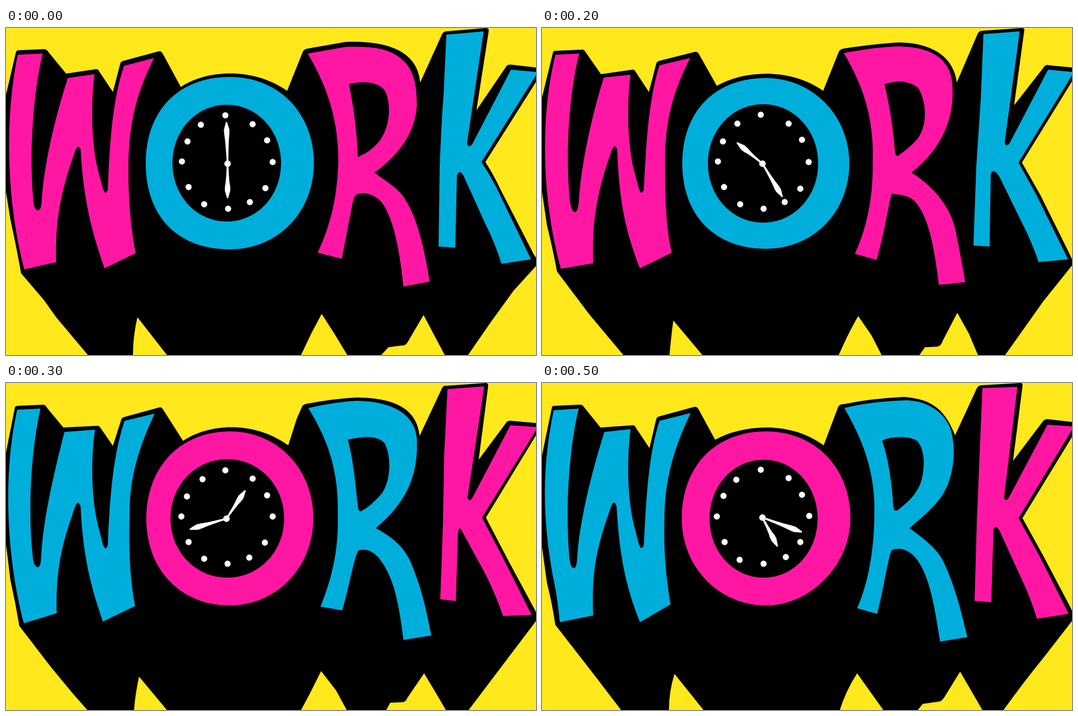
An HTML page with a canvas for the animation above (600 ms loop, 952 by 588 pixels).

```html
<!DOCTYPE html>
<html lang="en">
<head>
<meta charset="utf-8">
<title>Work clock</title>
<style>
html, body { margin: 0; width: 100%; height: 100%; overflow: hidden; background: #ffe81b; }
canvas { display: block; width: 100vw; height: 100vh; }
</style>
</head>
<body>
<canvas id="stage" width="952" height="588"></canvas>
<script>
const ctx = document.getElementById('stage').getContext('2d');
const YELLOW = '#ffe81b', PINK = '#ff17a4', BLUE = '#00aedb';
const STEP = 100;

// Four hand-drawn poses of the lettering; the line "boils" between them.
// "bulge" rounds the ring's corners: top left, top right, bottom right, bottom left.
const poses = [
  {
    colors: [PINK, BLUE],
    shadow: 'M18,43 Q19,40 23,40 L68,38 Q73,38 76,43 L108,82 L162,74 Q166,74 168,79 L192,115 L205,65 Q206,60 211,59 L274,42 Q279,41 282,47 L314,106 C362,74 446,71 505,113 L533,43 Q535,38 542,37 L610,25 C700,22 740,50 744,98 L782,14 Q785,6 791,6 L862,0 Q868,0 867,6 L845,148 L898,70 Q901,65 908,66 L952,71 V97 L861,241 Q876,264 888,290 L948,407 L952,413 V428 L912,472 L870,530 L830,588 H788 L750,516 L722,564 Q718,572 710,571 L687,574 L674,588 H613 L590,550 L567,514 L548,550 L530,588 H289 L236,520 Q228,555 228,588 H147 L90,520 L68,489 L27,441 Q20,400 8,345 L0,295 V120 Z',
    w: 'M21,48 L66,46 C50,110 41,220 49,310 Q51,328 57,328 Q63,328 64,312 C68,250 84,175 111,90 L159,83 C153,130 152,200 165,255 L174,289 Q179,303 183,290 C186,210 191,130 212,68 L266,54 C238,110 219,165 220,260 C220,310 224,360 233,405 L177,432 C155,370 139,310 134,218 Q130,209 125,219 C100,290 88,340 90,421 L33,434 C5,330 -6,180 21,48Z',
    ring: [402, 243, 151, 155],
    bulge: [.61, .58, .57, .62],
    face: [396.5, 243, 97.5, 105],
    r: 'M542,46 L610,34 C660,33 690,36 715,60 C735,80 738,110 738,140 C735,185 710,225 662,260 C685,278 706,288 718,310 C740,345 752,400 761,456 L714,465 C708,410 698,340 672,310 C658,298 645,296 634,298 Q625,299 622,318 L603,415 L560,404 C585,350 595,300 597,240 C597,170 580,110 542,46Z M616,101 C640,95 670,95 682,115 C692,140 690,175 672,202 C655,222 645,226 632,232 C630,180 624,140 616,101Z',
    k: 'M791,12 L858,6 L828,207 Q831,218 838,208 L907,75 L952,79 V85 L854,241 Q868,262 880,285 L943,416 L890,424 Q878,385 860,350 L822,266 Q815,253 810,265 L807,395 L777,393 L779,250 Q782,170 786,120Z',
    dots: [394,157, 443,173, 469,202, 479,241, 466,288, 438,313, 399,325, 356,317, 328,286, 316,240, 326,204, 350,174],
    hub: [398, 244]
  },
  {
    colors: [BLUE, PINK],
    shadow: 'M18,43 Q19,41 23,41 L68,39 Q73,39 76,44 L105,80 L163,76 Q167,76 169,81 L193,117 L205,66 Q206,61 211,60 L273,43 Q278,42 281,47 L311,102 C362,74 446,68 506,112 L532,43 Q534,38 542,38 Q590,28 650,25 C705,29 725,52 742,94 L779,14 Q783,3 790,4 L860,0 Q864,0 863,6 L846,140 L899,70 Q902,65 908,65 L952,70 V97 L863,243 L900,310 L950,405 L952,410 V428 L900,495 Q865,538 829,588 H791 L751,519 L724,563 Q718,573 712,573 L684,577 L675,588 H613 L566,522 Q545,555 535,588 H290 L238,523 Q228,555 228,588 H142 L90,520 L24,435 Q17,390 9,360 L0,295 V130 Z',
    w: 'M21,49 L66,46 C50,110 41,220 49,312 Q51,333 57,333 Q62,333 63,317 C67,250 88,165 112,88 L159,83 C153,130 152,200 165,255 L174,290 Q179,303 183,291 C187,210 191,130 211,68 L267,54 C238,115 221,170 220,240 C218,310 224,355 231,398 L176,430 C150,365 139,310 134,222 Q130,209 125,220 C102,285 88,330 92,418 L32,430 Q27,380 20,350 C2,250 -2,160 21,49Z',
    ring: [402.5, 243.5, 151.5, 156.5],
    bulge: [.6, .58, .53, .56],
    face: [398, 244, 97, 106],
    r: 'M543,45 Q590,33 655,31 C690,32 720,50 733,80 C743,110 742,150 728,185 C715,215 690,235 660,261 C700,290 715,305 725,330 C745,375 755,420 764,457 L715,465 C705,400 695,340 669,312 C655,298 640,295 628,301 C620,320 615,365 602,415 L566,405 C590,350 596,290 597,240 C600,160 575,100 543,45Z M611,104 C620,97 660,93 675,105 C690,125 687,160 680,180 C670,205 655,215 640,228 Q632,233 631,222 C628,170 620,130 611,104Z',
    k: 'M791,9 L854,7 L830,205 Q832,215 838,207 L908,75 L952,78 V84 L856,243 L893,310 L946,415 L889,424 Q878,388 865,360 L822,266 Q815,253 811,264 L807,394 L777,392 L781,250 L786,130Z',
    dots: [393,156, 443,171, 467,201, 480,239, 464,286, 438,313, 398,325, 355,318, 328,286, 314,240, 326,203, 349,174],
    hub: [396, 242]
  },
  {
    colors: [PINK, BLUE],
    shadow: 'M20,43 Q21,41 25,41 L70,39 Q75,38 78,43 L106,83 L162,75 Q166,74 169,80 L192,115 L205,65 Q206,60 211,59 L274,43 Q279,42 282,47 L314,104 C362,76 446,71 505,113 L533,43 Q535,38 542,37 Q600,28 642,26 C705,27 740,55 745,98 L781,14 Q784,5 790,5 L862,0 Q868,0 866,6 L848,139 L901,71 Q904,65 911,67 L952,71 V96 L862,242 L895,300 L947,405 L952,416 V427 L900,492 L832,588 H783 L767,550 L746,512 L720,562 Q717,572 710,573 L688,574 L678,588 H610 L592,553 L568,518 Q552,545 533,588 H288 L236,526 Q233,545 229,588 H146 L85,515 L27,438 Q20,400 9,355 L0,295 V125 Z',
    w: 'M24,48 L67,46 C50,110 41,220 50,310 Q53,331 59,331 Q64,331 66,314 C70,250 86,170 111,89 L159,84 C153,130 152,200 165,255 L174,289 Q179,303 183,290 C187,210 191,130 211,67 L266,54 C238,110 221,160 221,240 C221,310 223,360 233,404 L176,432 C152,370 139,320 135,218 Q131,208 126,218 C102,285 89,340 92,423 L34,433 C5,330 -8,180 24,48Z',
    ring: [402, 243.5, 150, 153.5],
    bulge: [.61, .56, .57, .61],
    face: [397, 243.5, 99, 106.5],
    r: 'M542,45 Q600,34 640,33 C700,34 733,55 737,100 C742,160 720,215 664,260 C710,290 733,325 742,360 C750,400 756,430 760,457 L713,462 C706,410 698,340 668,310 C657,301 645,300 628,298 C620,330 616,365 601,417 L562,406 C588,350 595,290 594,240 C597,160 575,100 542,45Z M615,101 C640,93 660,95 676,108 C694,140 690,180 674,200 C660,215 650,222 641,229 Q635,233 634,222 C630,170 622,130 615,101Z',
    k: 'M793,11 L858,6 L831,206 Q834,215 840,207 L909,75 L952,79 V85 L856,242 L888,300 L945,416 L892,421 Q880,385 862,350 L822,268 Q811,250 806,263 L804,393 L775,391 L780,250 L788,130Z',
    dots: [393,156, 443,172, 467,201, 479,241, 464,289, 436,313, 398,325, 356,317, 327,286, 316,240, 325,204, 351,172],
    hub: [396, 244]
  },
  {
    colors: [BLUE, PINK],
    shadow: 'M16,44 Q17,41 22,41 L67,39 Q71,39 74,45 L103,80 L164,77 Q168,77 170,81 L192,113 L207,66 Q208,62 213,61 L275,44 Q280,43 283,49 L318,104 C366,72 446,68 507,112 L522,65 L532,42 Q534,38 542,37 Q590,28 630,26 C705,27 738,50 743,95 L781,14 Q785,3 791,5 L862,0 Q867,0 866,6 L849,138 L898,72 Q901,67 908,68 L952,72 V94 L862,242 L900,315 L950,408 L952,412 V428 L890,510 L831,588 H790 L772,557 L751,522 L721,566 Q718,574 712,574 L690,575 L683,588 H612 L593,553 L566,518 L545,560 L530,588 H289 L239,528 Q232,560 230,588 H146 L118,556 L80,510 L24,437 Q17,395 8,355 L0,290 V125 Z',
    w: 'M20,48 L62,46 C47,110 38,220 48,312 Q50,331 57,331 Q62,331 63,316 C66,250 84,170 105,88 L160,84 C153,130 152,200 165,255 L174,290 Q179,304 183,291 C186,210 192,130 213,68 L267,55 C239,115 221,170 222,240 C220,310 224,360 232,401 L174,429 C152,365 138,310 134,222 Q130,210 125,220 C102,285 89,330 91,414 L32,432 C5,330 -9,180 20,48Z',
    ring: [402, 243.5, 150, 156.5],
    bulge: [.59, .57, .56, .59],
    face: [397.5, 243.5, 102, 106.5],
    r: 'M543,45 Q590,34 630,32 C700,33 735,60 738,100 C741,165 720,215 664,261 C700,280 720,300 732,335 C750,380 757,420 764,454 L714,462 C706,400 698,350 670,315 C657,300 645,298 633,301 C624,318 618,360 604,409 L565,402 C590,340 597,290 596,240 C598,160 580,105 543,45Z M614,102 C640,96 665,93 680,108 C694,135 690,180 674,200 C660,215 650,224 639,230 Q633,233 632,222 C627,170 622,130 614,102Z',
    k: 'M793,11 L859,6 L829,206 Q832,216 838,206 L906,76 L952,79 V85 L855,242 L893,315 L944,417 L893,419 Q880,382 862,345 L820,268 Q815,256 812,267 L808,392 L780,389 L785,250 L787,130Z',
    dots: [394,157, 443,172, 469,202, 479,240, 465,287, 437,314, 398,325, 356,316, 328,286, 315,240, 325,204, 353,173],
    hub: [396, 244]
  }
];
for (const p of poses)
  for (const key of ['shadow', 'w', 'r', 'k']) p[key] = new Path2D(p[key]);

// Tip of the minute hand, then of the hour hand, for each step of the loop.
const hands = [
  [396, 169, 398, 306],
  [468, 237, 342, 274],
  [432, 304, 350, 206],
  [330, 263, 430, 193],
  [380, 172, 443, 269],
  [467, 268, 423, 294]
];

const ROUND = Array(4).fill(.56);

function fill(path, color) {
  ctx.fillStyle = color;
  ctx.fill(path, 'evenodd');
}

function oval([x, y, rx, ry], color, [tl, tr, br, bl] = ROUND) {
  const path = new Path2D();
  const curve = (...c) => path.bezierCurveTo(...c.map((v, i) => i % 2 ? y + v * ry : x + v * rx));
  path.moveTo(x - rx, y);
  curve(-1, -tl, -tl, -1, 0, -1);
  curve(tr, -1, 1, -tr, 1, 0);
  curve(1, br, br, 1, 0, 1);
  curve(-bl, 1, -1, bl, -1, 0);
  fill(path, color);
}

function hand([x, y], tipX, tipY) {
  const len = Math.hypot(tipX - x, tipY - y);
  ctx.save();
  ctx.translate(x, y);
  ctx.rotate(Math.atan2(tipY - y, tipX - x));
  fill(new Path2D(`M0,-1.5 Q${len * .5},-2.4 ${len - 22},-4.6 L${len - 14},-5 L${len},-1 V1 L${len - 14},5 L${len - 22},4.6 Q${len * .5},2.4 0,1.5Z`), '#fff');
  ctx.restore();
}

function draw(step) {
  const p = poses[step % poses.length];
  const [main, accent] = p.colors;
  const [mx, my, hx, hy] = hands[step];
  ctx.fillStyle = YELLOW;
  ctx.fillRect(0, 0, 952, 588);
  fill(p.shadow, '#000');
  fill(p.w, main);
  oval(p.ring, accent, p.bulge);
  oval(p.face, '#000');
  fill(p.r, main);
  fill(p.k, accent);
  for (let i = 0; i < p.dots.length; i += 2)
    oval([p.dots[i], p.dots[i + 1], 5.5, 5.5], '#fff');
  hand(p.hub, mx, my);
  hand(p.hub, hx, hy);
  oval([...p.hub, 5.8, 5.8], '#fff');
}

const start = performance.now();
function tick() {
  const t = Math.max(0, performance.now() - start);
  draw(Math.floor(t / STEP) % hands.length);
  requestAnimationFrame(tick);
}
tick();
</script>
</body>
</html>
```
